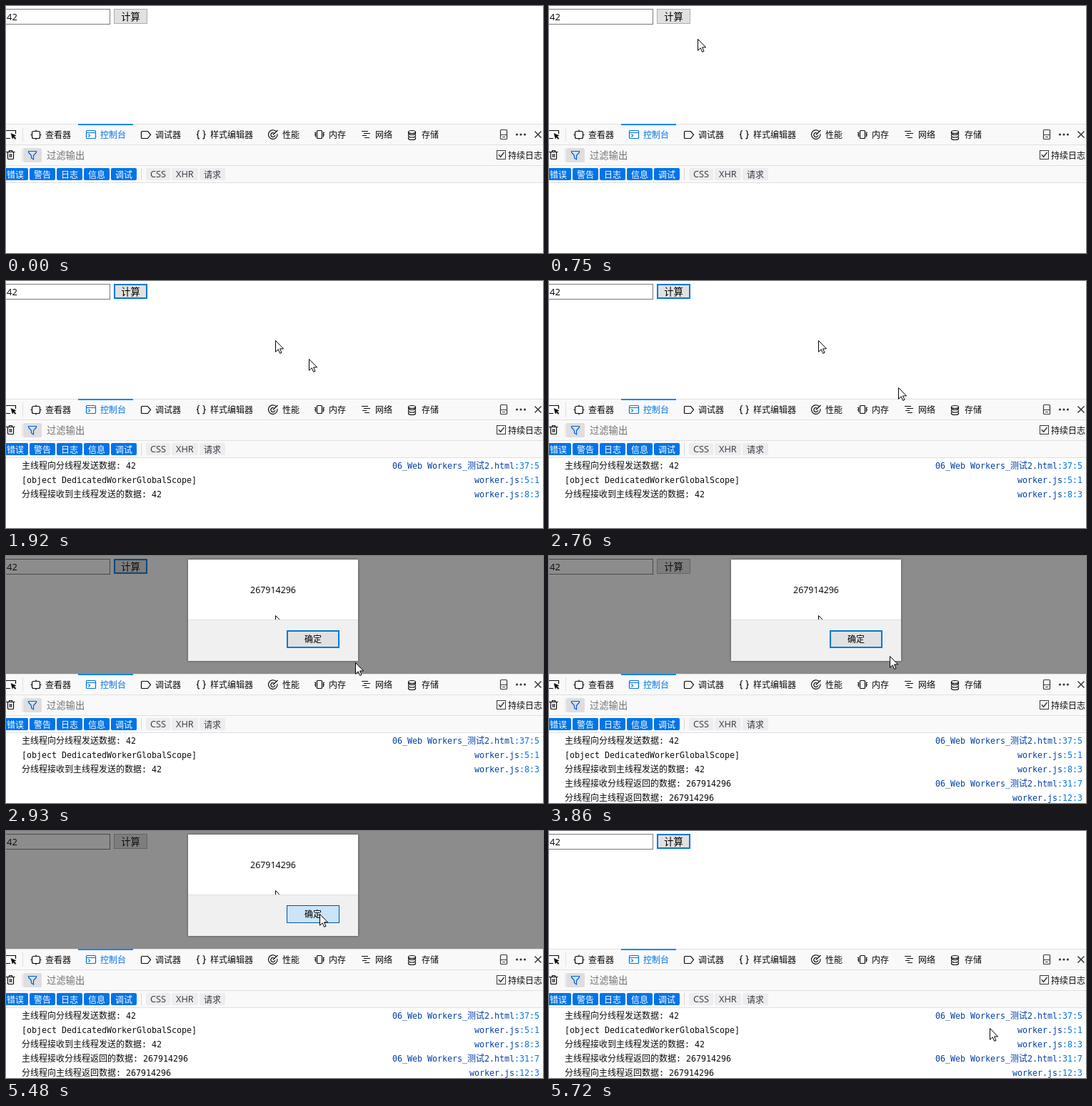
These frames come from a looping animation (752x346 px, 5.81 s). An HTML page with a canvas:

```html
<!DOCTYPE html>
<html lang="zh-CN">
<head>
<meta charset="utf-8">
<title>Web Workers</title>
<style>
html, body { margin: 0; width: 100%; height: 100%; overflow: hidden; background: #fff; }
canvas { display: block; }
</style>
</head>
<body>
<canvas id="stage" width="752" height="346"></canvas>
<script>
const ctx = document.getElementById('stage').getContext('2d');
const LOOP = 5810;
const CJK = '"Noto Sans CJK SC", "Noto Sans CJK", sans-serif';
const UI = '"Open Sans", "Noto Sans CJK SC", sans-serif';
const MONO = '"DejaVu Sans Mono", monospace';
const INK = '#0c0c0d', GREY = '#38383d', BLUE = '#0074e8';

// Pointer stops: time, x, y
const stops = [
  [120, 628, 334],
  [440, 612, 321], [520, 524, 264], [600, 402, 184], [680, 288, 104], [750, 208, 46], [830, 173, 20],
  [1000, 171, 19], [1070, 169, 18],
  [1610, 212, 29], [1690, 262, 43], [1770, 320, 62], [1840, 377, 83],
  [1920, 424, 109], [2000, 458, 131], [2070, 474, 140],
  [2300, 477, 142], [2380, 480, 144], [2460, 483, 146], [2530, 485, 148], [2610, 487, 149], [2760, 489, 149],
  [3860, 477, 140], [3940, 465, 132], [4010, 453, 124], [4090, 443, 119], [4160, 438, 118],
  [4870, 439, 116], [5720, 617, 276]
];
const pageButton = [[0, 'idle'], [830, 'hover'], [1240, 'down'], [1380, 'hover'],
  [1610, 'focus'], [3000, 'idle'], [5650, 'focus']];
const okButton = [[2930, 'focus'], [4010, 'hover'], [5480, 'down']];
const looks = {
  idle: ['#e1e1e1', '#adadad', 1],
  focus: ['#e1e1e1', '#0078d7', 2],
  hover: ['#e5f1fb', '#0078d7', 1],
  down: ['#cce4f7', '#005499', 1]
};
const logs = [
  [1460, '主线程向分线程发送数据: 42', '06_Web Workers_测试2.html', ':37:5'],
  [1460, '[object DedicatedWorkerGlobalScope]', 'worker.js', ':5:1'],
  [1460, '分线程接收到主线程发送的数据: 42', 'worker.js', ':8:3'],
  [3000, '主线程接收分线程返回的数据: 267914296', '06_Web Workers_测试2.html', ':31:7'],
  [3000, '分线程向主线程返回数据: 267914296', 'worker.js', ':12:3']
];

const latest = (list, t) => list.filter(s => s[0] <= t).pop();

function box(x, y, w, h, color) {
  ctx.fillStyle = color;
  ctx.fillRect(x, y, w, h);
}

function frame(x, y, w, h, color, width = 1) {
  ctx.strokeStyle = color;
  ctx.lineWidth = width;
  ctx.strokeRect(x + width / 2, y + width / 2, w - width, h - width);
}

function pill(x, y, w, h, color) {
  ctx.fillStyle = color;
  ctx.beginPath();
  ctx.roundRect(x, y, w, h, 2);
  ctx.fill();
}

function text(str, x, y, size, color, family = CJK, align = 'left') {
  ctx.font = `${size}px ${family}`;
  ctx.fillStyle = color;
  ctx.textAlign = align;
  ctx.fillText(str, x, y);
}

function draw(d, color = INK, width = 1.2, fill) {
  const path = new Path2D(d);
  if (fill) {
    ctx.fillStyle = fill;
    ctx.fill(path);
  }
  ctx.strokeStyle = color;
  ctx.lineWidth = width;
  ctx.stroke(path);
}

// Monospace line with full-width Chinese runs; returns the end x
function mono(str, x, y, color) {
  for (const run of str.match(/[\u4e00-\u9fff]+|[^\u4e00-\u9fff]+/g)) {
    const wide = run.charCodeAt(0) > 255;
    text(run, x, y, wide ? 12 : 11.63, color, wide ? CJK : MONO);
    x += run.length * (wide ? 12 : 7);
  }
  return x;
}

const monoWidth = s => [...s].reduce((w, c) => w + (c > '\u00ff' ? 12 : 7), 0);

function button(x, y, w, h, state, label, size, base) {
  const [fill, edge, width] = looks[state];
  box(x, y, w, h, fill);
  frame(x, y, w, h, edge, width);
  text(label, x + w / 2, y + base, size, '#000', CJK, 'center');
}

function pointer(x, y) {
  ctx.save();
  ctx.translate(x, y);
  draw('M.5 .5V16.3L4.2 12.8L6.7 18.4L9 17.4L6.6 11.9H11.6Z', '#000', 1, '#fff');
  ctx.restore();
}

function page(t) {
  box(0, 0, 752, 165, '#fff');
  frame(-2, 4, 148, 22, '#7a7a7a');
  text('42', 1, 20, 13, '#000', UI);
  button(151, 4, 47, 21, latest(pageButton, t)[1], '计算', 13.33, 16);
}

function dialog(t) {
  box(0, 0, 752, 165, 'rgba(26,26,26,.5)');
  ctx.save();
  ctx.shadowColor = 'rgba(0,0,0,.5)';
  ctx.shadowBlur = 3;
  box(255, 5, 238, 142, '#fff');
  ctx.restore();
  box(255, 89, 238, 58, '#f0f0f0');
  box(255, 89, 238, 1, '#dfdfdf');
  text('267914296', 374, 52, 12.4, '#000', UI, 'center');
  button(393, 104, 74, 25, latest(okButton, t)[1], '确定', 12, 17);
}

function tabIcons() {
  // Element picker
  draw('M0 174.5H13.5V179M0 185.5H6');
  draw('M7 178.5L14 181.5L11.3 182.5L14 185.5L12.8 186.6L10.3 183.8L9 186Z', INK, .5, INK);
  // Inspector
  draw('M38.5 175.5H45.5Q47.5 175.5 47.5 177.5V183.5Q47.5 185.5 45.5 185.5H38.5Q36.5 185.5 36.5 183.5V177.5Q36.5 175.5 38.5 175.5Z' +
    'M34.5 180.5H36.5M47.5 180.5H49.5M42 173.5V175.5M42 185.5V187.5');
  // Console
  draw('M113.5 174.5H124.5Q125.5 174.5 125.5 175.5V184.5Q125.5 185.5 124.5 185.5H113.5Q112.5 185.5 112.5 184.5V175.5Q112.5 174.5 113.5 174.5ZM112.5 177.5H125.5M115.5 179.5L117.5 181.5L115.5 183.5', BLUE);
  // Debugger
  draw('M190.5 175.5H198.5L202.5 180.3L198.5 185.5H190.5Q189.5 185.5 189.5 184.5V176.5Q189.5 175.5 190.5 175.5Z');
  // Style editor
  draw('M271 174.5Q268.8 174.5 268.8 176.5V178.5Q268.8 180.2 267 180.2Q268.8 180.2 268.8 182V184Q268.8 186 271 186' +
    'M275.5 174.5Q277.7 174.5 277.7 176.5V178.5Q277.7 180.2 279.5 180.2Q277.7 180.2 277.7 182V184Q277.7 186 275.5 186');
  // Performance
  draw('M378 175.4A6.3 6.3 0 1 0 380 179.2M375.5 178A3 3 0 1 0 376.8 181M373.7 180.6L380.5 174');
  // Memory
  draw('M436.5 174.5H441.5Q442.5 174.5 442.5 175.5V184.5Q442.5 185.5 441.5 185.5H436.5Q435.5 185.5 435.5 184.5V175.5Q435.5 174.5 436.5 174.5Z' +
    'M432 177.5H433.5V183.5M432 180.5H433.5M446 177.5H444.5V183.5M446 180.5H444.5');
  // Network
  draw('M498 175.5H507M501 178.5H510M499 181.5H505M502 184.5H509');
  // Storage
  draw('M563.5 176.5A5 2 0 0 1 573.5 176.5A5 2 0 0 1 563.5 176.5V178.5A5 2 0 0 0 573.5 178.5V176.5' +
    'M563.5 180.5V182A5 2 0 0 0 573.5 182V180.5M563.5 184V185.5A5 2 0 0 0 573.5 185.5V184');
  // Dock, menu, close
  draw('M693.5 173.5H700.5Q701.5 173.5 701.5 174.5V185.5Q701.5 186.5 700.5 186.5H693.5Q692.5 186.5 692.5 185.5V174.5Q692.5 173.5 693.5 173.5ZM692.5 180.5H701.5M695 183.5H699', GREY);
  for (const x of [715.5, 721, 726.5]) {
    ctx.beginPath();
    ctx.arc(x, 180, 1.6, 0, 7);
    ctx.fillStyle = GREY;
    ctx.fill();
  }
  draw('M740.5 175.5L749.5 184.5M749.5 175.5L740.5 184.5', GREY, 1.5);
}

function tools(t) {
  box(0, 165, 752, 83, '#f9f9fa');
  for (const y of [165, 194, 223, 247]) box(0, y, 752, 1, '#e0e0e2');
  box(101, 165, 77, 2, '#0a84ff');
  box(23, 170, 1, 20, '#e0e0e2');
  tabIcons();
  const tabs = { 查看器: 55, 控制台: 132, 调试器: 209, 样式编辑器: 286, 性能: 387, 内存: 452, 网络: 517, 存储: 582 };
  for (const name in tabs) text(name, tabs[name], 185, 12, name === '控制台' ? BLUE : INK);

  // Filter row
  draw('M0 204.5H12.5M4.5 204V202.5H8.5V204M2.5 204.5V213.5Q2.5 214.5 3.5 214.5H9.5Q10.5 214.5 10.5 213.5V204.5M5.5 207V212M7.5 207V212');
  box(22, 200, 1, 18, '#e0e0e2');
  pill(24, 199, 26, 20, '#dedee0');
  draw('M31.5 203.5H42.5V205L38.5 209.5V215L35.5 213V209.5L31.5 205Z', '#0060df');
  text('过滤输出', 57, 214, 13.3, '#737373');
  frame(687, 202, 13, 13, GREY);
  draw('M689.8 208.3L692.6 211.3L697.5 205', GREY, 1.4);
  text('持续日志', 703, 214, 12, INK);

  // Category row
  ['错误', '警告', '日志', '信息', '调试'].forEach((name, i) => {
    pill(38 * i - 5, 227, 36, 17, BLUE);
    text(name, 38 * i + 1, 241, 12, '#fff');
  });
  box(189, 227, 1, 17, '#d7d7db');
  [['CSS', 196, 34], ['XHR', 232, 37], ['请求', 271, 36]].forEach(([name, x, w]) => {
    pill(x, 227, w, 17, '#ededf0');
    const latin = name.length === 3;
    text(name, x + 6, latin ? 240 : 241, latin ? 12.8 : 12, GREY, latin ? UI : CJK);
  });

  // Output
  box(0, 248, 752, 98, '#fff');
  logs.forEach(([at, msg, file, pos], i) => {
    if (t < at) return;
    const y = 263 + 20 * i;
    mono(msg, 22, y, INK);
    const x = mono(file, 747 - monoWidth(file + pos), y, '#003eaa');
    mono(pos, x, y, BLUE);
  });
}

function render(t) {
  const open = t >= 2930 && t < 5650;
  page(t);
  if (open) dialog(t);
  // A stray pointer image stays on the page until the dialog closes
  if (t >= 1840 && t < 5650) {
    ctx.save();
    ctx.beginPath();
    ctx.rect(0, 0, 752, open ? 89 : 165);
    ctx.clip();
    pointer(377, 83);
    ctx.restore();
  }
  tools(t);
  const stop = latest(stops, t);
  if (stop) pointer(stop[1], stop[2]);
}

function tick() {
  render(performance.now() % LOOP);
  requestAnimationFrame(tick);
}
tick();
</script>
</body>
</html>
```
